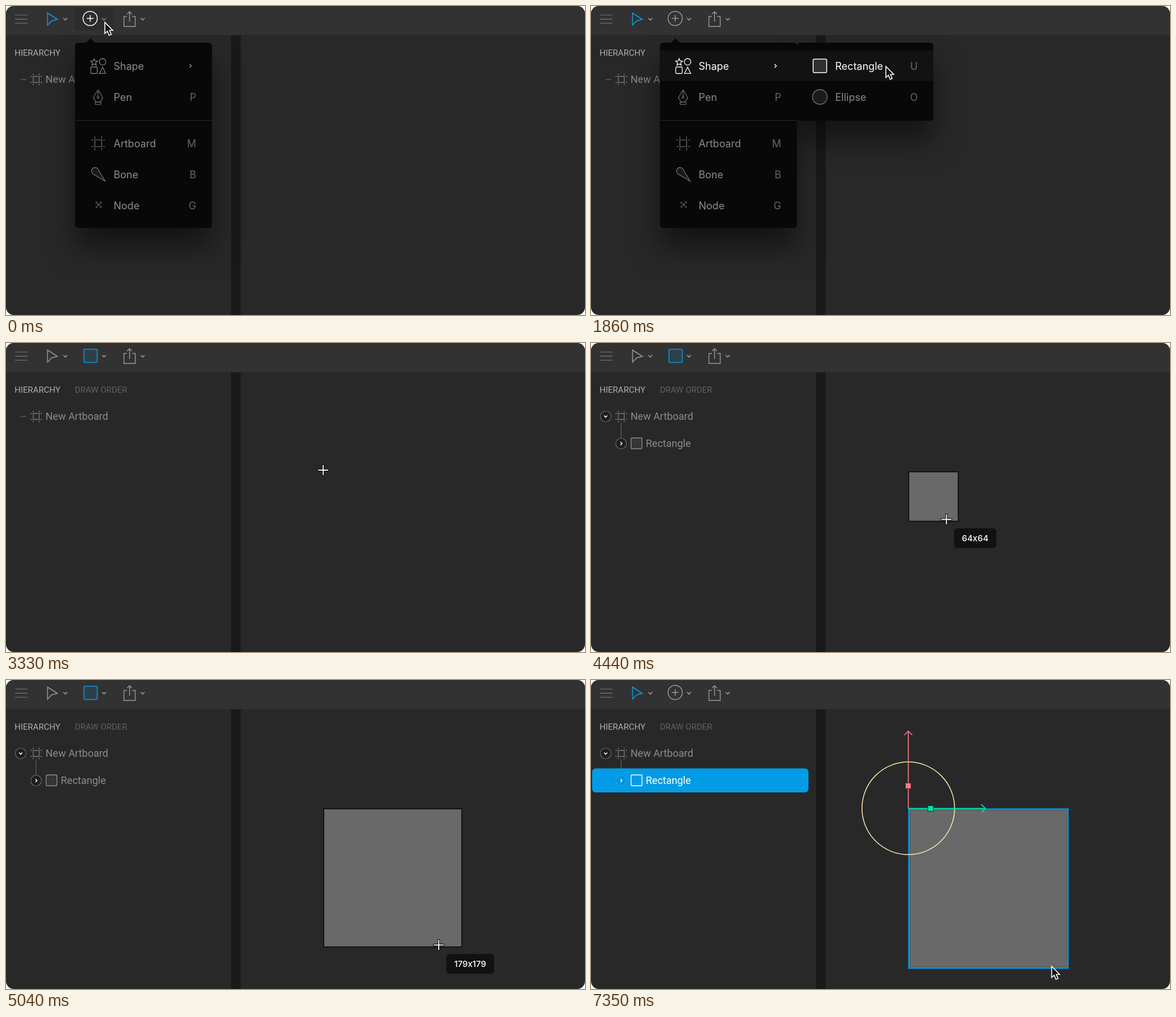
Animation, 1025 px wide and 547 px high, one loop 7530 ms. Source, as an HTML page with a canvas:

```html
<!DOCTYPE html>
<html lang="en">
<head>
<meta charset="utf-8">
<title>Drawing a rectangle</title>
<style>
html, body { margin: 0; width: 100%; height: 100%; overflow: hidden; background: #fff; }
canvas { display: block; width: 1025px; height: 547px; }
</style>
</head>
<body>
<canvas id="stage"></canvas>
<script>
const W = 1025, H = 547, LOOP = 7530;
const OPEN_SUB = 870, PICK = 2430, DRAG = 4140, DROP = 5910;
const UNIT = 1.366;
const BLUE = '#029be5', GRAY = '#8c8c8c', DIM = '#666', WHITE = '#fff';
const UI = 'Inter, sans-serif', TREE = 'Roboto, sans-serif';

const canvas = document.getElementById('stage');
const ratio = window.devicePixelRatio || 1;
canvas.width = W * ratio;
canvas.height = H * ratio;
const c = canvas.getContext('2d');

// Pointer keys: time, x, y
const HOVER = [[570, 175, 29], [840, 213, 98], [990, 226, 107], [1110, 236, 108],
  [1320, 402, 107], [1590, 496, 107], [1860, 522, 107]];
const AIM = [[2730, 522, 107], [3040, 545, 172], [3330, 561.5, 225]];
const PULL = [[4110, 561.5, 225], [4440, 629, 312], [4890, 747, 450],
  [5040, 766, 469], [5550, 813.5, 504], [5640, 815.5, 507]];

// Monotone cubic through the keys, at rest at both ends
function along(keys, t, axis) {
  const last = keys.length - 1;
  if (t <= keys[0][0]) return keys[0][axis];
  if (t >= keys[last][0]) return keys[last][axis];
  let i = 0;
  while (t > keys[i + 1][0]) i++;
  const slope = k => (keys[k + 1][axis] - keys[k][axis]) / (keys[k + 1][0] - keys[k][0]);
  const tangent = k => {
    if (k === 0 || k === last) return 0;
    const a = slope(k - 1), b = slope(k);
    return a * b > 0 ? 2 * a * b / (a + b) : 0;
  };
  const d = keys[i + 1][0] - keys[i][0], u = (t - keys[i][0]) / d;
  const h = u * u * (3 - 2 * u);
  return keys[i][axis] * (1 - h) + keys[i + 1][axis] * h +
    d * (tangent(i) * u * (1 - u) ** 2 - tangent(i + 1) * u * u * (1 - u));
}

function pointer(t) {
  const keys = t < PICK ? HOVER : t < DRAG - 30 ? AIM : PULL;
  return [along(keys, t, 1), along(keys, t, 2)];
}

function paint(stroke, width = 1.3, fill) {
  if (fill) { c.fillStyle = fill; c.fill(); }
  if (stroke) { c.strokeStyle = stroke; c.lineWidth = width; c.stroke(); }
}

function line(points, stroke, width, fill, closed) {
  c.beginPath();
  for (let i = 0; i < points.length; i += 2) c.lineTo(points[i], points[i + 1]);
  if (closed) c.closePath();
  paint(stroke, width, fill);
}

function box(x, y, w, h, r, stroke, width, fill) {
  c.beginPath();
  c.roundRect(x, y, w, h, r);
  paint(stroke, width, fill);
}

function disc(x, y, r, stroke, width, fill) {
  c.beginPath();
  c.arc(x, y, r, 0, Math.PI * 2);
  paint(stroke, width, fill);
}

function text(str, x, y, font, color, align = 'left') {
  c.font = font;
  c.fillStyle = color;
  c.textAlign = align;
  c.fillText(str, x, y);
}

function chevron(x, y, color, right, s = 3.4, width = 1.5) {
  const k = s / 2;
  line(right ? [x - k, y - s, x + k, y, x - k, y + s] : [x - s, y - k, x, y + k, x + s, y - k], color, width);
}

function artboardIcon(x, y, half, reach, color) {
  box(x - half, y - half, half * 2, half * 2, 0, color, 1.2);
  for (const a of [-1, 1]) for (const b of [-1, 1]) {
    const p = a * half, q = b * (half + 2.2), r = b * reach;
    line([x + p, y + q, x + p, y + r], color, 1.2);
    line([x + q, y + p, x + r, y + p], color, 1.2);
  }
}

function toolbar(t) {
  const drawing = t >= PICK && t < DROP;
  c.fillStyle = '#323232';
  c.fillRect(0, 0, W, 51.5);
  for (const y of [16, 23.3, 30.5]) line([16, y, 38, y], '#777', 1.2);
  line([73.5, 12.5, 91, 23.8, 81, 26.2, 73.5, 34], drawing ? '#999' : '#0a9ee6', 1.5, null, true);
  chevron(105, 23.2, '#a0a0a0');
  const hot = t < 690;
  if (hot) box(122, 2, 68, 41, 4, null, 0, '#2c2c2c');
  if (drawing) {
    box(138, 11, 23.5, 23.5, 2, '#0a96dc', 1.6, '#2c404c');
  } else {
    const color = hot ? WHITE : '#999';
    disc(149, 22, 12.6, color, 1.5);
    line([143, 22, 155, 22], color, 1.5);
    line([149, 16, 149, 28], color, 1.5);
  }
  chevron(173.5, 23.2, hot ? '#888' : '#a0a0a0');
  line([214, 18.5, 208.7, 18.5, 208.7, 36.3, 228.7, 36.3, 228.7, 18.5, 223.5, 18.5], '#999', 1.4);
  line([218.7, 28, 218.7, 10.5], '#999', 1.4);
  line([214.5, 14.3, 218.7, 10, 223, 14.3], '#999', 1.4);
  chevron(242, 23.2, '#a0a0a0');
}

function hierarchy(t) {
  text('HIERARCHY', 15.3, 88.3, '15px ' + TREE, '#b0b0b0');
  text('DRAW ORDER', 122, 88.3, '15px ' + TREE, '#606060');
  artboardIcon(53.5, 130, 5.3, 10.3, '#858585');
  text('New Artboard', 70, 136.2, '18px ' + TREE, GRAY);
  if (t < DRAG) {
    line([26, 130, 36, 130], '#5a5a5a', 1.3);
    return;
  }
  const selected = t >= DROP;
  disc(26, 130, 9.5, '#6a6a6a', 1.2, '#1f1f1f');
  chevron(26, 130, WHITE, false, 2.7);
  line([53.3, 140.5, 53.3, 168], '#606060', 1.2);
  if (selected) box(2, 156.5, 383, 42.5, 6, null, 0, BLUE);
  disc(53.3, 178, 9.5, selected ? '#1fa9ee' : '#6a6a6a', 1.2, selected ? '#0294da' : '#1f1f1f');
  chevron(53.5, 178, WHITE, true, 2.7);
  box(71, 168, 19.3, 19.3, 2, selected ? WHITE : GRAY, 1.4, selected ? null : '#353535');
  text('Rectangle', 97, 184, '18px ' + TREE, selected ? WHITE : GRAY);
}

function shapeIcon(color) {
  const star = [];
  for (let i = 0; i < 10; i++) {
    const r = i % 2 ? 2.9 : 6.4, a = (i / 5 - 0.5) * Math.PI;
    star.push(156 + r * Math.cos(a), 99.6 + r * Math.sin(a));
  }
  line(star, color, 1.3, null, true);
  disc(171, 98.8, 5.8, color, 1.3);
  box(150, 108, 11.5, 11.5, 1.5, color, 1.3);
  line([171, 108.3, 165.5, 119.3, 176.5, 119.3], color, 1.3, null, true);
}

function penIcon(color) {
  c.beginPath();
  c.moveTo(163, 148.5);
  c.quadraticCurveTo(168, 155, 171.3, 163);
  c.quadraticCurveTo(168, 166, 167.3, 170);
  c.lineTo(158.7, 170);
  c.quadraticCurveTo(158, 166, 154.7, 163);
  c.quadraticCurveTo(158, 155, 163, 148.5);
  paint(color, 1.2);
  line([163, 149, 163, 160], color, 1.1);
  disc(163, 161.7, 1.7, color, 1.1);
  box(158, 170, 10, 4.3, 0.5, color, 1.1);
}

function boneIcon(color) {
  c.beginPath();
  c.moveTo(175.5, 310);
  c.lineTo(153.8, 297.3);
  c.bezierCurveTo(148.5, 292, 153, 284.5, 159.5, 286.3);
  c.quadraticCurveTo(163, 287.5, 164, 291);
  c.closePath();
  paint(color, 1.2, '#1a1a1a');
}

function nodeIcon(color) {
  for (const a of [-1, 1]) for (const b of [-1, 1]) {
    const x = 164 + 4.5 * a, y = 351.7 + 4.5 * b;
    line([x - 2.5 * a, y, x, y, x, y - 2.5 * b], color, 1.1);
    line([164, 351.7, 164 + 2.4 * a, 351.7 + 2.4 * b], color, 1.1);
  }
}

function shadow(x, y, w, h) {
  c.save();
  c.beginPath();
  c.rect(0, 51.5, W, H);
  c.clip();
  c.shadowColor = 'rgba(0,0,0,.5)';
  c.shadowBlur = 50 * ratio;
  c.shadowOffsetY = 34 * ratio;
  box(x, y, w, h, 6, null, 0, '#080808');
  c.restore();
}

function row(label, key, x, y, active) {
  text(label, x + 68.5, y + 6.3, '18px ' + UI, active ? WHITE : GRAY);
  if (key) text(key, x + 214.7, y + 6.3, '18px ' + UI, DIM, 'right');
}

function menus(t) {
  const sub = t >= OPEN_SUB;
  const overRect = t >= 1260;
  shadow(122.3, 65, 242, 328);
  if (sub) shadow(364, 65, 242, 138);
  box(122.3, 65, 242, 328, 6, null, 0, '#080808');
  line([140.5, 66, 149.5, 57, 158.5, 66], null, 0, '#080808');
  if (sub) {
    box(364, 65, 242, 138, 6, null, 0, '#080808');
    c.fillStyle = '#121212';
    c.fillRect(122.3, 78.5, 242, 54.7);
    if (overRect) c.fillRect(364, 78.5, 242, 54.7);
  }
  c.fillStyle = '#262626';
  c.fillRect(122.3, 202, 242, 1.2);

  const tint = sub ? WHITE : '#808080', gray = '#777';
  shapeIcon(tint);
  row('Shape', '', 122, 107, sub);
  chevron(326.5, 106, sub ? WHITE : GRAY, true, 3.2);
  penIcon(gray);
  row('Pen', 'P', 122, 161.7);
  artboardIcon(163.3, 243, 6, 12.3, gray);
  row('Artboard', 'M', 122, 243.8);
  boneIcon(gray);
  row('Bone', 'B', 122, 298.6);
  nodeIcon(gray);
  row('Node', 'G', 122, 353.4);

  if (!sub) return;
  box(393.3, 94, 24, 24, 2, overRect ? WHITE : gray, 1.5, overRect ? '#303030' : '#1b1b1b');
  row('Rectangle', 'U', 363.8, 107, overRect);
  disc(405.2, 161, 13, gray, 1.3, '#1b1b1b');
  row('Ellipse', 'O', 363.8, 161.7);
}

function gizmo() {
  const x = 561.7, y = 227.4, red = '#ff7b8d', green = '#00e0a1', edge = '#2b2b2b';
  disc(x, y - 0.3, 82, '#ffe9ab', 1.5);
  line([x, y, x, 91], red, 1.6);
  line([x - 7, 97.5, x, 90.5, x + 7, 97.5], red, 1.6);
  line([x, y, 698, y], green, 2);
  line([691, y - 7.3, 698.3, y, 691, y + 7.3], green, 1.8);
  box(x - 5, 182.3, 10, 10, 0, edge, 1, red);
  box(596.2, y - 5, 10, 10, 0, edge, 1, green);
}

function shape(t, [px, py]) {
  const size = py - 225;
  if (size <= 0.5) return;
  const selected = t >= DROP;
  box(562.5, 228, size + 0.3, size + 0.3, 0, '#050505', 1.5, '#696969');
  if (selected) {
    box(565, 230.5, size - 5, size - 5, 0, '#555', 1);
    box(562.9, 228.6, size - 0.7, size - 0.7, 0, '#0497e2', 2.8);
    gizmo();
    return;
  }
  const n = Math.round(size / UNIT), label = n + 'x' + n;
  c.font = '500 15px ' + UI;
  const w = c.measureText(label).width + 28;
  box(px + 13.3, py + 15.8, w, 35, 6, null, 0, '#111');
  text(label, px + 13.3 + w / 2, py + 38.8, c.font, WHITE, 'center');
}

function cursor(t, [x, y]) {
  if (t < PICK || t >= DROP) {
    c.save();
    c.translate(x, y);
    c.lineJoin = 'miter';
    line([0, 0, 0, 19.5, 4.5, 15.6, 7.6, 23, 11.3, 21.4, 8.2, 14.2, 14, 14], WHITE, 1.6, '#111', true);
    c.restore();
    return;
  }
  for (const [color, width, arm] of [['#000', 4, 10], [WHITE, 1.9, 9]]) {
    line([x - arm, y, x + arm, y], color, width);
    line([x, y - arm, x, y + arm], color, width);
  }
}

function draw(t) {
  const at = pointer(t);
  c.setTransform(ratio, 0, 0, ratio, 0, 0);
  c.clearRect(0, 0, W, H);
  c.save();
  c.beginPath();
  c.roundRect(0, 0, W, H, 14);
  c.clip();
  c.fillStyle = '#282828';
  c.fillRect(0, 0, W, H);
  c.fillStyle = '#191919';
  c.fillRect(398.5, 51.5, 17, H);
  toolbar(t);
  hierarchy(t);
  if (t < PICK) menus(t);
  if (t >= DRAG) shape(t, at);
  cursor(t, at);
  c.restore();
}

const start = performance.now();
function tick() {
  draw((performance.now() - start) % LOOP);
  requestAnimationFrame(tick);
}
tick();
</script>
</body>
</html>
```
